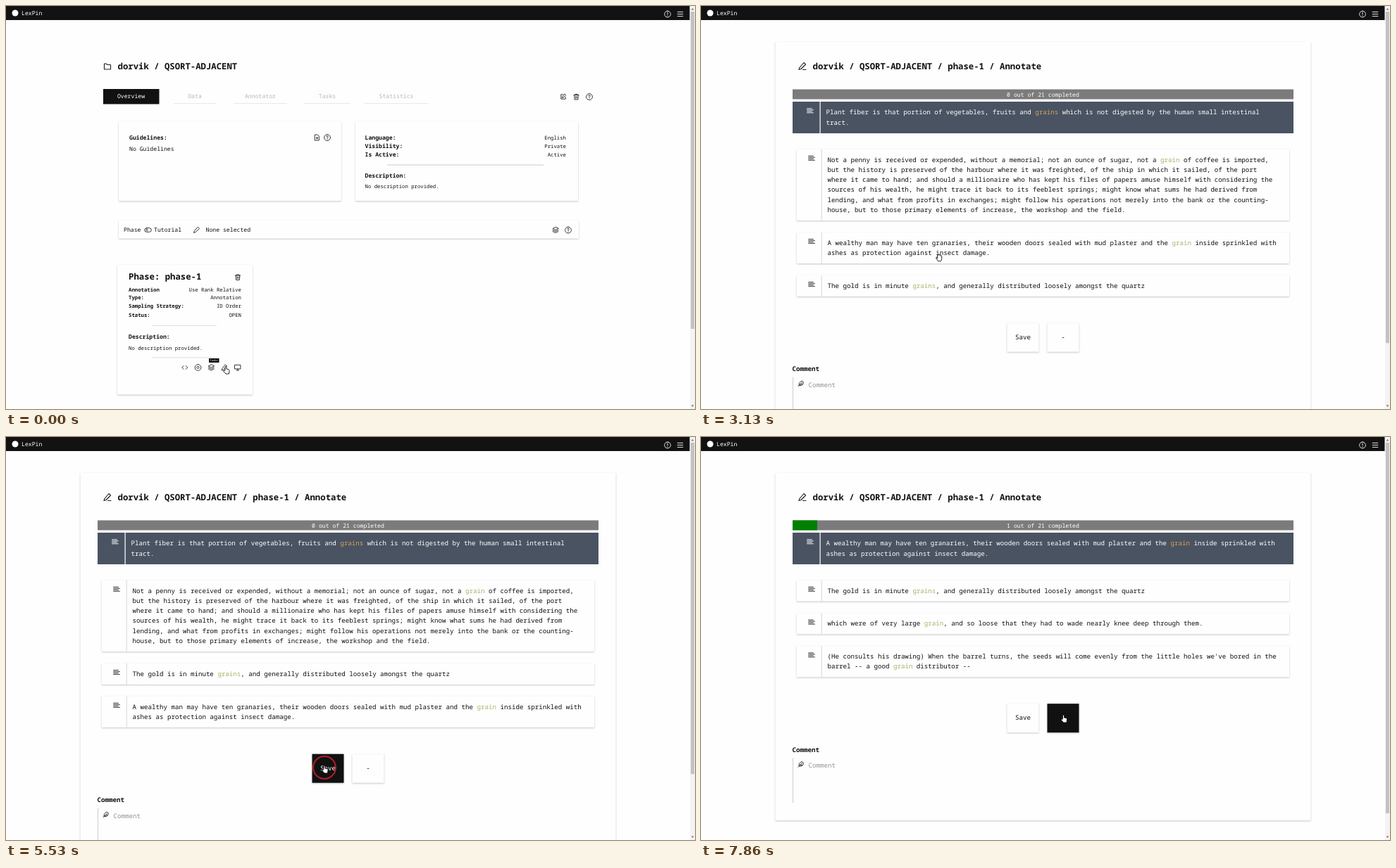
Animation, 978 px wide and 573 px high, one loop 8000 ms. Source, as an HTML page:

```html
<!DOCTYPE html>
<html lang="en">
<head>
<meta charset="utf-8">
<title>Annotation demo</title>
<style>
html, body { margin: 0; width: 100%; height: 100%; overflow: hidden; background: #fefefe; }
svg { display: block; width: 978px; height: 573px; }
text { font: 500 9.17px "Noto Sans Mono", "DejaVu Sans Mono", monospace; fill: #111; white-space: pre; text-rendering: geometricPrecision; }
.xs { font-size: 7.3px; }
.sm { font-size: 8.17px; }
.lg { font-size: 12.3px; }
.b { font-weight: 700; }
.w { fill: #fff; }
.g { fill: #b5b5b5; }
.mid { text-anchor: middle; }
.end { text-anchor: end; }
.card { fill: #fefefe; filter: drop-shadow(0 1px 1px rgba(0,0,0,.22)); }
.icon { fill: none; stroke-width: 2.3; stroke-linecap: round; stroke-linejoin: round; }
.hit { fill: #a9b46c; }
.head .hit { fill: #d8a057; }
.head text { fill: #fff; }
.on .card { fill: #111; }
.on text { fill: #fff; }
#ghost text { font-size: 10px; letter-spacing: -.8px; }
#cursor path { stroke: #111; stroke-width: .9; fill: #fff; stroke-linejoin: round; }
#cursor .arrow { fill: #111; stroke: #fff; stroke-width: .6; }
</style>
</head>
<body>
<svg id="stage" viewBox="0 0 978 573"></svg>
<script>
const icons = {
  folder: 'M3 4h6l2 3h10v13H3z',
  edit: 'M11 4H4v16h16v-7M18 2.5l3.5 3.5L12 15l-4 1 1-4z',
  trash: 'M3 6h18M8 6V3h8v3M5 6l1 16h12l1-16M10 11v6M14 11v6',
  help: 'M12 1a11 11 0 1 0 .1 0M9 9a3 3 0 1 1 4 3c-1 .5-1 1-1 2M12 17v.5',
  alert: 'M12 1a11 11 0 1 0 .1 0M12 6v7M12 17v.5',
  menu: 'M2 4h20M2 12h20M2 20h20',
  pen: 'M17 2l5 5L8 20l-6 2 2-6z',
  pencil: 'M16 2l5 5L8 20l-6 2 2-6zM13 22h9',
  layers: 'M12 2L2 7l10 5 10-5zM2 12l10 5 10-5M2 17l10 5 10-5',
  code: 'M8 6l-6 6 6 6M16 6l6 6-6 6',
  target: 'M12 1a11 11 0 1 0 .1 0M12 8a4 4 0 1 0 .1 0',
  monitor: 'M2 3h20v14H2zM8 22h8M12 17v4',
  file: 'M5 2h9l5 5v15H5zM12 10v7M9 14h6',
  toggle: 'M7 5h10a7 7 0 0 1 0 14H7a7 7 0 0 1 0-14zM8 9a3 3 0 1 0 .1 0',
  feather: 'M20 12a6 6 0 0 0-8-8L5 11v8h8zM16 8L2 22M17 15H9',
  lines: 'M1 4h17M1 9h22M1 14h17M1 19h22'
};
const glyphs = {
  arrow: 'M2.5-3V7.5L5 5.2l1.6 3.4 1.5-.7L6.6 4.6H9.6z',
  pointer: 'M-1 3V-2q1-1.5 2 0V1l3.2.8q1 .5.8 2L4.5 8H0L-3.5 4q0-1.5 1.5-.6z',
  hand: 'M-2 2.5l1-.8 1 1.8V-1q.8-1 1.6 0v-.7q.8-1 1.6 0v.7q.8-.8 1.6 0v1q1-.6 1.4.3V4.5L5 7.5H1z',
  fist: 'M-1.5 3.5v-2q1-1 2-.5 1-1 2 0 1-1 2 0 1.2-.5 1.8.6V4.5L5 7.5H.5z'
};

const text = (x, y, s, cls = '') =>
  `<text x="${x}" y="${y}" class="${cls}">${s.replace(/\*(.+?)\*/g, '<tspan class="hit">$1</tspan>')}</text>`;
const rect = (x, y, w, h, fill, cls = '') =>
  `<rect x="${x}" y="${y}" width="${w}" height="${h}" fill="${fill}" class="${cls}"/>`;
const card = (x, y, w, h) => rect(x, y, w, h, '', 'card');
const icon = (name, x, y, color = '#222', k = .4) =>
  `<path class="icon" stroke="${color}" d="${icons[name]}" transform="translate(${x - 12 * k} ${y - 12 * k}) scale(${k})"/>`;
const paragraph = (x, y, s) =>
  s.split('|').map((line, i) => text(x, y + i * 14.3, line)).join('');
const scrollbar = bottom =>
  rect(971, 0, 7, 573, '#f3f3f3') + rect(972, 8, 5, bottom - 8, '#c2c2c2') +
  '<path fill="#777" d="M972.5 5.5l2-2.5 2 2.5zM972.5 567.5l2 2.5 2-2.5z"/>';

const project = 'dorvik / QSORT-ADJACENT';

function overview() {
  const tabs = [['Data', 268, 30], ['Annotator', 361, 38], ['Tasks', 456, 33], ['Statistics', 554, 46]];
  const facts = [['Language:', 'English'], ['Visibility:', 'Private'], ['Is Active:', 'Active']];
  const phase = [['Annotation', 'Use Rank Relative', 406], ['Type:', 'Annotation', 416.5],
    ['Sampling Strategy:', 'ID Order', 429], ['Status:', 'OPEN', 441.5]];
  const tools = ['code', 'target', 'layers', 'pencil', 'monitor'];
  return scrollbar(459) +
    icon('folder', 144, 86, '#222', .5) + text(158.5, 89.7, project, 'lg b') +
    rect(138, 118, 79.5, 21.5, '#111') + text(177.5, 131, 'Overview', 'sm w mid') +
    tabs.map(([s, x, r]) => text(x, 131, s, 'sm g mid') + rect(x - r, 138, 2 * r, 1.2, '#eaeaea')).join('') +
    icon('edit', 791, 129) + icon('trash', 809.5, 129) + icon('help', 828, 129) +
    card(160, 164, 316, 113) + card(496, 164, 316, 113) +
    text(175, 189.5, 'Guidelines:', 'sm b') + text(175, 206, 'No Guidelines', 'sm') +
    icon('file', 441.5, 187) + icon('help', 456, 187) +
    facts.map(([k, v], i) => text(509.5, 189.5 + i * 12.2, k, 'sm b') +
      text(795, 189.5 + i * 12.2, v, 'xs end')).join('') +
    rect(541, 225.5, 222, 1, '#ccc') +
    text(509.5, 243.5, 'Description:', 'sm b') + text(509.5, 259, 'No description provided.', 'xs') +
    card(160, 305, 653, 25.5) + text(167, 321.3, 'Phase', 'sm') + icon('toggle', 201.5, 318.5) +
    text(210, 321.3, 'Tutorial', 'sm') + icon('pen', 270.5, 318.5) +
    text(283.5, 321.3, 'None selected', 'sm') + icon('layers', 780, 318.5) + icon('help', 798, 318.5) +
    card(158, 368, 192, 184.5) + text(174, 389, 'Phase: phase-1', 'lg b') + icon('trash', 329, 385.5) +
    phase.map(([k, v, y]) => text(174, y, k, 'xs b') + text(334, y, v, 'xs end')).join('') +
    rect(207, 454, 92, 1, '#ddd') +
    text(174, 472.5, 'Description:', 'sm b') + text(174, 488.5, 'No description provided.', 'xs') +
    rect(207, 499.5, 92, 1, '#ddd') +
    tools.map((name, i) => icon(name, 253.7 + i * 18.8, 514)).join('') +
    rect(288, 501, 14.5, 6, '#111') + '<text x="295" y="505.3" class="w mid" style="font-size:3.6px">Tasks</text>';
}

const pages = [
  {
    done: 0,
    head: 'Plant fiber is that portion of vegetables, fruits and *grains* which is not digested by the human small intestinal|tract.',
    items: [
      'Not a penny is received or expended, without a memorial; not an ounce of sugar, not a *grain* of coffee is imported,|but the history is preserved of the harbour where it was freighted, of the ship in which it sailed, of the port|where it came to hand; and should a millionaire who has kept his files of papers amuse himself with considering the|sources of his wealth, he might trace it back to its feeblest springs; might know what sums he had derived from|lending, and what from profits in exchanges; might follow his operations not merely into the bank or the counting-|house, but to those primary elements of increase, the workshop and the field.',
      'A wealthy man may have ten granaries, their wooden doors sealed with mud plaster and the *grain* inside sprinkled with|ashes as protection against insect damage.',
      'The gold is in minute *grains*, and generally distributed loosely amongst the quartz'
    ]
  },
  {
    done: 0,
    head: 'is that the acts of interpretation I describe are richly in the cinematic *grain*: movies legitimize every kind of|fantasy, not excluding the fantasy of full explanation.',
    items: [
      '"And if it seems there are more nameless ex-Tolve staffers than *grain*s of sand on a beach, and that no one wants to|offend him, well, that \' s about right. """',
      '"A growing phenomenon, ORVA Provisions now rivals the big private* grai*n companies. """',
      '"said the old lady, "" every bit an*d gra*in of my comfort \' s gone, "" and removing her spectacles she continued|silently rubbing them with her apron"'
    ]
  },
  {
    done: 1,
    head: 'A wealthy man may have ten granaries, their wooden doors sealed with mud plaster and the *grain* inside sprinkled with|ashes as protection against insect damage.',
    items: [
      'The gold is in minute *grains*, and generally distributed loosely amongst the quartz',
      'which were of very large *grain*, and so loose that they had to wade nearly knee deep through them.',
      '(He consults his drawing) When the barrel turns, the seeds will come evenly from the little holes we\'ve bored in the|barrel -- a good *grain* distributor --'
    ]
  }
];

function annotate(page) {
  let y = 203.5;
  page.boxes = page.items.map(s => {
    const box = { x: 136, y, w: 699, h: 30 + 14.3 * (s.split('|').length - 1) };
    y += box.h + 16.8;
    return box;
  });
  const c = y + 41;   // centre line of the buttons
  page.buttons = [434.5, 491.5].map(x => ({ x, y: c - 20, w: 45, h: 41 }));
  const items = page.items.map((s, i) => {
    const b = page.boxes[i];
    return `<g class="item">${card(b.x, b.y, b.w, b.h)}${rect(170.7, b.y, 1, b.h, '#d8d8d8')}` +
      icon('lines', 157, b.y + 13) + paragraph(179.5, b.y + 18, s) + '</g>';
  });
  const buttons = page.buttons.map((b, i) =>
    `<g class="button">${card(b.x, b.y, b.w, b.h)}${text(b.x + 22.5, c + 3, ['Save', '-'][i], 'mid')}</g>`);
  return card(105.5, 51, 760, c + 95) + scrollbar(479 + (471 - c) * .78) +
    icon('pencil', 144, 85.5, '#222', .5) + text(158.5, 89.7, project + ' / phase-1 / Annotate', 'lg b') +
    rect(130, 118.5, 711, 14, '#7b7b7b') + (page.done ? rect(130, 118.5, 35, 14, '#008000') : '') +
    text(485.5, 129.3, page.done + ' out of 21 completed', 'sm w mid') +
    `<g class="head">${rect(130, 136, 711, 45, '#4a5362')}${rect(168.5, 136, 1.2, 45, '#fff')}` +
    icon('lines', 155, 149, '#fff') + paragraph(177.5, 154.3, page.head) + '</g>' +
    items.join('') + buttons.join('') +
    text(129.5, c + 48.5, 'Comment', 'b') + rect(130, c + 57, 1, 64, '#ccc') +
    icon('feather', 142, c + 66) + `<g opacity=".45">${text(152.5, c + 71, 'Comment')}</g>`;
}

const stage = document.getElementById('stage');
stage.innerHTML = [overview, ...pages.map(p => () => annotate(p))].map(f => `<g class="page">${f()}</g>`).join('') +
  rect(0, 0, 970.5, 20, '#121212') + '<circle cx="13" cy="10" r="4.5" fill="#fff"/>' +
  text(22, 13, 'LexPin', 'sm w') + icon('alert', 939, 11.5, '#fff') + icon('menu', 957, 11.5, '#fff', .38) +
  `<g id="ghost">${rect(0, 29, 698, 1.5, '#d8d8d8')}${rect(50, 8, 1, 17, '#ddd')}` +
  icon('lines', 37, 4) + text(58.5, 10.5, pages[0].items[2]) + '</g>' +
  '<circle id="ring" r="16" fill="none" stroke="#d4222c" stroke-width="2" opacity=".82"/><g id="cursor">' +
  Object.keys(glyphs).map(k => `<path class="${k}" d="${glyphs[k]}"/>`).join('') + '</g>';

const all = (sel, root = stage) => [...root.querySelectorAll(sel)];
const [ghost, ring, cursor] = ['ghost', 'ring', 'cursor'].map(id => document.getElementById(id));
const views = all('.page');
const firstItems = all('.item', views[1]);
const show = (el, on) => { el.style.display = on ? '' : 'none'; };
const move = (el, x, y) => el.setAttribute('transform', `translate(${x} ${y})`);
const inside = (p, b) => p.x >= b.x && p.x <= b.x + b.w && p.y >= b.y && p.y <= b.y + b.h;
const ease = (t, from, to) => {
  const p = Math.min(1, Math.max(0, (t - from) / (to - from)));
  return p * p * (3 - 2 * p);
};
const mix = (a, b, p) => a + (b - a) * p;

// Cursor moves: start, end, x, y
const start = { x: 312, y: 515 };
const moves = [
  [1420, 2280, 332, 232], [2300, 2540, 334, 222], [2800, 3280, 336, 395], [3480, 4060, 341, 303],
  [4400, 5300, 452, 470], [6200, 6870, 500, 350], [7050, 7340, 513, 404], [7620, 7840, 514.5, 398]
];
const clicks = [[800, 1000], [3420, 4330], [5500, 5800], [7360, 7600]];
const pageStarts = [0, 1000, 5800, 7600];
const [grab, drop] = clicks[1], settled = drop + 200;

function draw(t) {
  const at = moves.reduce((p, [from, to, x, y]) => {
    const k = ease(t, from, to);
    return { x: mix(p.x, x, k), y: mix(p.y, y, k) };
  }, start);
  const current = pageStarts.filter(s => t >= s).length - 1;
  views.forEach((v, i) => show(v, i === current));

  // Dragging the third item into the second slot
  const swap = ease(t, 3770, 3970), landing = ease(t, drop, settled);
  const floating = t >= grab && t < settled;
  move(firstItems[1], 0, 46.8 * swap);
  move(firstItems[2], 0, t >= settled ? -61.1 : 0);
  show(firstItems[2], !floating);
  show(ghost, floating);
  move(ghost, mix(at.x - 217, 136, landing), mix(at.y - 7, 321.8, landing));

  let shape = 'pointer';
  if (current) {
    const page = pages[current - 1];
    const over = page.buttons.map(b => inside(at, b));
    all('.button', views[current]).forEach((b, i) => b.classList.toggle('on', over[i]));
    if (t >= grab && t < drop) shape = 'fist';
    else if (!over.includes(true)) shape = page.boxes.some(b => inside(at, b)) ? 'hand' : 'arrow';
  }
  all('path', cursor).forEach(p => show(p, p.classList.contains(shape)));
  move(cursor, at.x, at.y);
  move(ring, at.x, at.y);
  show(ring, clicks.some(([from, to]) => t >= from && t < to));
}

function tick() {
  draw(performance.now() % 8000);
  requestAnimationFrame(tick);
}
tick();
</script>
</body>
</html>
```
